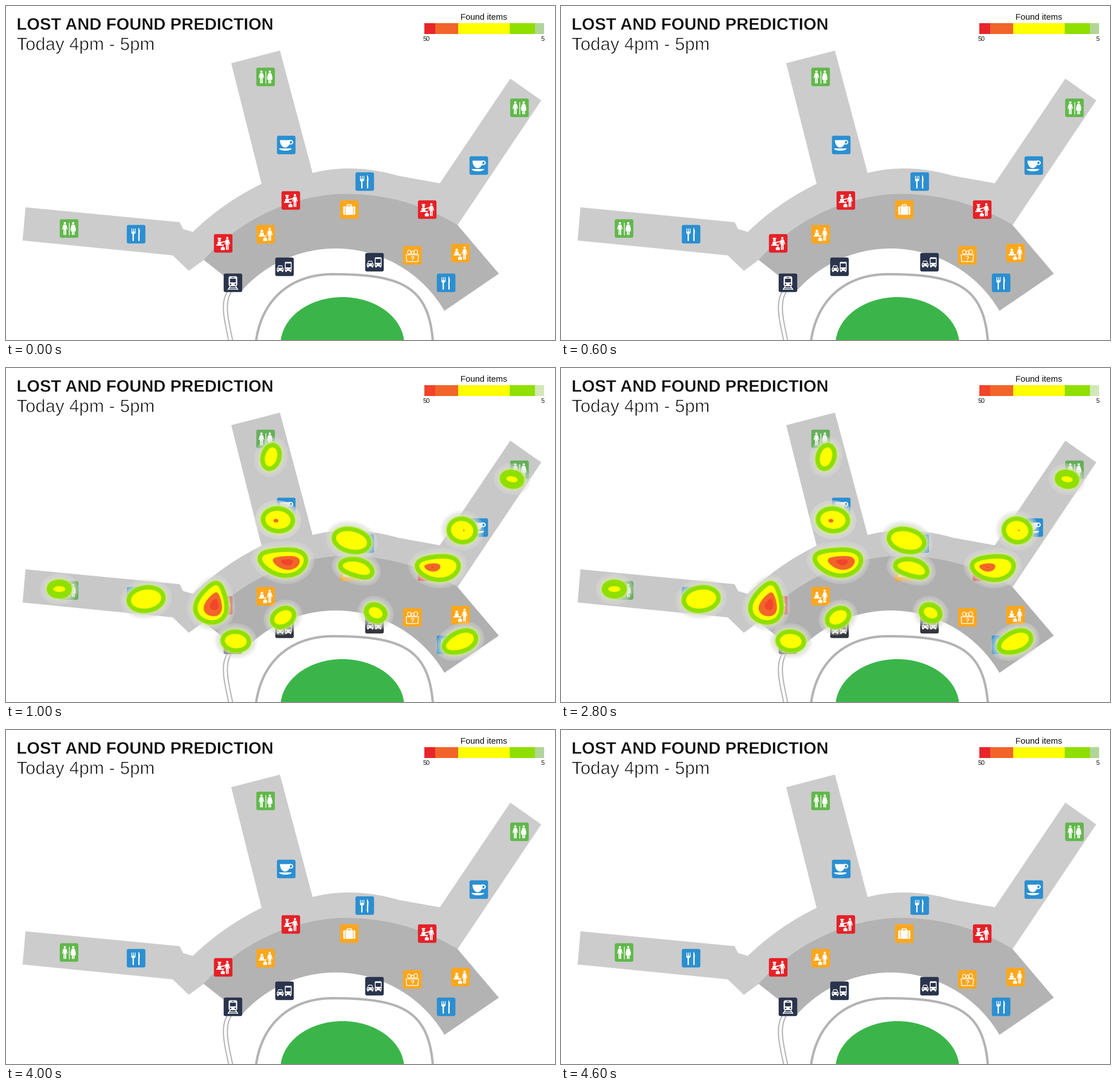
Animation of 958x584 px, one loop 5000 ms. Source, as a matplotlib script:

```python
from math import comb

import numpy as np
import matplotlib.pyplot as plt
from matplotlib.animation import FuncAnimation
from matplotlib.patches import Circle, Ellipse, FancyBboxPatch, Polygon, Rectangle
from matplotlib.patheffects import Stroke

W, H, DPI = 958, 584, 64
PT = 72 / DPI  # points per pixel

LIGHT, DARK = "#cccccc", "#b3b3b3"
RED, ORANGE, YELLOW, LIME, PALE = "#e8252b", "#f1652a", "#ffff00", "#8fdf00", "#b1d598"
GREEN, BLUE, SIGN, AMBER, NAVY = "#61b84a", "#2b8fd1", "#e52127", "#fda71c", "#2a344c"
HOT_RED = "#f2442a"
# Colours that differ while the heat layer is on
WARM = {LIGHT: "#c8c8c8", DARK: "#b0b0b0", RED: HOT_RED, PALE: "#d4e7b9",
        GREEN: "#65b05a", NAVY: "#33363c"}

fig = plt.figure(figsize=(W / DPI, H / DPI), dpi=DPI, facecolor="white")
ax = fig.add_axes([0, 0, 1, 1])
ax.set_xlim(0, W)
ax.set_ylim(H, 0)
ax.axis("off")

tinted, heat_layer = [], []


def add(patch, color, z=1):
    patch.set(facecolor=color, edgecolor="none", linewidth=0, zorder=z)
    ax.add_patch(patch)
    if color in WARM:
        tinted.append((patch, color))


# ---- curves ----
def arc(p, q, r):
    """Circular arc from p through q to r."""
    z = np.array([complex(*k) for k in (p, q, r)])
    w = (z[2] - z[0]) / (z[1] - z[0])
    mid = z[0] + (z[1] - z[0]) * (w - abs(w) ** 2) / (2j * w.imag)
    turn = np.unwrap(np.angle(z - mid))
    c = mid + abs(z[0] - mid) * np.exp(1j * np.linspace(turn[0], turn[2], 50))
    return np.column_stack([c.real, c.imag])


def bezier(*points):
    n, t = len(points) - 1, np.linspace(0, 1, 50)[:, None]
    return sum(comb(n, i) * t**i * (1 - t) ** (n - i) * np.array(p)
               for i, p in enumerate(points))


def oval(x, y, rx, ry, tilt=0, egg=0, bend=0):
    """Ellipse that can taper to one end and bow its long axis."""
    a, r = np.linspace(0, 2 * np.pi, 60), np.radians(tilt)
    u = rx * np.cos(a)
    v = ry * (np.sin(a) * (1 + egg * np.cos(a)) + bend * np.cos(2 * a))
    return np.column_stack([x + u * np.cos(r) - v * np.sin(r),
                            y + u * np.sin(r) + v * np.cos(r)])


# ---- floor plan and header ----
def draw_plan():
    add(Polygon(np.vstack([
        [(29, 410), (34, 352), (303, 378), (309, 390)],
        arc((326, 395), (383, 348), (446, 311)),
        [(393, 100), (478, 78)],
        bezier((535, 292), (605, 274), (685, 297)),
        [(757, 310), (880, 127), (934, 165), (788, 383)],
        [(575, 420), (345, 444), (319, 463), (291, 436)],
    ])), LIGHT)
    add(Polygon(np.vstack([
        arc((345, 444), (440, 369), (575, 329)),
        bezier((575, 329), (690, 324), (788, 383)),
        [(860, 468)],
        arc((765, 533), (578, 424), (412, 497)),
    ])), DARK)

    def track(points, width):
        ax.plot(*points.T, color=DARK, lw=width * PT, zorder=1)

    track(bezier((436, 588), (446, 510), (500, 469), (570, 469)), 4.2)
    track(bezier((570, 469), (690, 469), (738, 490), (745, 588)), 4.2)
    for dx in (0, 7):
        track(bezier((387, 498), (373, 520), (381, 548), (389, 587)) + (dx, 0), 2)
    add(Ellipse((587, 592), 216, 166), "#3bb54a")


def label(x, y, text, size, thin=0.0, **kw):
    t = ax.text(x, y, text, fontsize=size * PT, family="Liberation Sans",
                color="#0c0c0c", va="baseline", **kw)
    if thin:
        t.set_path_effects([Stroke(linewidth=thin * PT, foreground="white")])


def draw_header():
    label(18.5, 41.5, "LOST AND FOUND PREDICTION", 29.2, 0.4, weight="bold")
    label(18.5, 77, "Today 4pm - 5pm", 31.2, 0.8)
    label(833.5, 24, "Found items", 14.7, ha="center")
    label(728, 61, "50", 11)
    label(934, 61, "5", 11)
    edges = [730, 749, 789, 879, 923, 939]
    for a, b, c in zip(edges, edges[1:], [RED, ORANGE, YELLOW, LIME, PALE]):
        add(Rectangle((a, 30), b - a, 19), c)


# ---- icons ----
class Icon:
    """Rounded tile with a white glyph drawn around its centre."""

    def __init__(self, x, y, color):
        self.x, self.y, self.bg = x, y, color
        self.box(0, -16.2, 32.4, 32.4, 3, color)

    def box(self, mid, top, w, h, r=0.01, c="white"):
        add(FancyBboxPatch((self.x + mid - w / 2, self.y + top), w, h,
                           boxstyle=f"round,pad=0,rounding_size={r}"), c, 2)

    def dot(self, x, y, r, c="white"):
        add(Circle((self.x + x, self.y + y), r), c, 2)

    def poly(self, pts, c="white"):
        add(Polygon(np.array(pts) + (self.x, self.y)), c, 2)

    def trapezoid(self, mid, top, w, base, h, c="white"):
        self.poly([(mid - w / 2, top), (mid + w / 2, top),
                   (mid + base / 2, top + h), (mid - base / 2, top + h)], c)

    def line(self, pts, w=1.5):
        ax.plot(*(np.array(pts) + (self.x, self.y)).T, color="white", lw=w * PT,
                solid_capstyle="round", zorder=2)

    def person(self, x, dress=False):
        self.dot(x, -9.3, 2)
        if dress:
            self.trapezoid(x, -6.7, 4, 9.4, 11.7)
        else:
            self.box(x, -6.7, 4.8, 9.5, 0.8)
        for s in (-1, 1):
            self.line([(x + 2.2 * s, -5.8), (x + 4.1 * s, 1.3)], 1.4)
            self.box(x + 1.35 * s, 2, 2, 9.3)


def toilets(k):
    k.person(-7.3)
    k.line([(0, -10.5), (0, 11)], 1.3)
    k.person(7.3, dress=True)


def cup(k):
    half = np.linspace(0, np.pi, 24)
    for mid, top, rx, ry in [(-2, -8.5, 9, 13), (-1.5, 6, 11, 4)]:
        k.poly(np.column_stack([mid + rx * np.cos(half), top + ry * np.sin(half)]))
    k.line(oval(7.6, -4.8, 3.7, 3.2), 1.8)


def cutlery(k):
    for dx in (-2.7, 0, 2.7):
        k.line([(dx - 4.9, -10.5), (dx - 4.9, -3.5)], 1.3)
    k.box(-4.9, -4.5, 6.6, 4, 1.5)
    k.poly(bezier((4, -11.5), (7.5, -9), (7.2, 1.5), (4, 1.5)))
    for x in (-4.9, 5.4):
        k.line([(x, -2), (x, 10.5)], 2.3)


def clerk(k):
    k.dot(-6.5, -5.5, 2.3)
    k.box(-6.5, -2.8, 7, 4.8, 1.5)
    k.box(-5.5, 2, 13, 2.2)
    k.person(7.2)
    k.box(-0.7, 7, 7, 4.8, 0.8)
    k.box(-0.7, 5.4, 3, 2)


def officer(k):
    clerk(k)
    k.box(-6.5, -9.7, 6.4, 2.1, 0.7)
    k.line([(-4, -1.5), (4.5, -3.5)], 1.7)


def suitcase(k):
    k.box(0, -9.3, 9, 5, 1.5)
    k.box(0, -7.6, 5.6, 3, 0.5, k.bg)
    k.box(0, -5.8, 21, 15, 2)
    for x in (-7, 7):
        k.box(x, -5.8, 1, 15, c=k.bg)


def basket(k):
    k.trapezoid(0, -1.6, 23, 21, 13)
    k.trapezoid(0, -0.3, 20.2, 18.4, 10.4, k.bg)
    for x, r in [(-5.5, 3.6), (0.5, 2.8), (6, 4)]:
        k.line(oval(x, -2 - r, r * 0.8, r), 1.2)
    ax.text(k.x, k.y + 9, "?", fontsize=11 * PT, family="Liberation Sans",
            weight="bold", color="white", ha="center", va="baseline", zorder=2)


def traffic(k):
    k.trapezoid(-7.5, -2.5, 6.4, 10.5, 5.5)
    k.trapezoid(-7.5, -1.2, 5, 7.6, 3, k.bg)
    k.box(-7.5, 2.2, 11.8, 5, 1)
    k.box(6.5, -8.6, 11.8, 15.8, 1.6)
    k.box(6.5, -5.8, 9, 6.8, c=k.bg)
    for mid in (-7.5, 6.5):
        for s in (-1, 1):
            k.dot(mid + 3.7 * s, 4.4, 1, k.bg)
            k.box(mid + 3.9 * s, 6.5, 2.5, 2.6)


def train(k):
    k.box(0, -11.5, 15, 17.5, 3)
    k.box(0, -7.3, 10.4, 6.6, 0.8, k.bg)
    k.box(0, -10, 5, 1.1, c=k.bg)
    for s in (-1, 1):
        k.dot(4.2 * s, 2.6, 1.4, k.bg)
        k.line([(5 * s, 6.5), (8.5 * s, 11.7)], 1.6)
    for y, w in [(8.6, 12), (11.3, 16)]:
        k.box(0, y - 0.6, w, 1.3)


ICONS = [
    (toilets, GREEN, [(453, 124), (896, 178), (110, 389)]),
    (cup, BLUE, [(489, 243), (825, 279)]),
    (cutlery, BLUE, [(626, 307), (227, 399), (768, 484)]),
    (officer, SIGN, [(497, 340), (379, 415), (735, 356)]),
    (suitcase, AMBER, [(599, 356)]),
    (clerk, AMBER, [(453, 399), (793, 432)]),
    (basket, AMBER, [(709, 436)]),
    (traffic, NAVY, [(486, 456), (643, 448)]),
    (train, NAVY, [(396, 484)]),
]


# ---- heat map ----
def layer(outline, color, grow, z, alpha=1.0):
    solid = alpha == 1
    p = Polygon(outline, facecolor=color if solid else "none", edgecolor=color,
                linewidth=2 * grow * PT, joinstyle="round", alpha=alpha, zorder=z)
    heat_layer.append(ax.add_patch(p))


def heat(x, y, rx, ry, *form, hot=None):
    """Yellow spot, lime band and soft halo; hot = centre and share of the hot part."""
    spot = oval(x, y, rx, ry, *form)
    band = max(8, 15 - 0.7 * ry)  # small spots fade more slowly
    glow = [(11, "#dedede", 0.32), (7.5, "#d6dacd", 0.35),
            (4, "#d9efa0", 0.4), (2, "#bfe860", 0.5)]
    for z, (extra, color, alpha) in enumerate(glow, 5):
        layer(spot, color, band + extra, z, alpha)
    layer(spot, LIME, band, 9)
    layer(spot, "#c6ef00", 0.9, 10)
    layer(spot, YELLOW, 0, 11)
    if hot:
        hx, hy, share = hot
        inner = oval(hx, hy, rx * share, ry * share, *form)
        layer(inner, "#fba51c", 0.7, 12)
        layer(inner, ORANGE, 0, 13)
        core = max(0, share - 0.35)
        layer(oval(hx + 4 * core, hy, rx * core, ry * core, *form), HOT_RED, 0, 14)


def draw_heat():
    # centre, half axes, then tilt, taper and bow
    heat(462.5, 155.5, 16.5, 9.8, -75)
    heat(474.5, 265.5, 21.5, 15, 5)
    heat(474.5, 265.5, 21.5, 15, 5, hot=(471, 267, 0.18))
    heat(483, 337.5, 36, 18, 3, 0.2, -0.15, hot=(489, 339, 0.64))
    heat(603, 301.5, 27, 15, 13)
    heat(611.5, 350, 24, 9.5, 15, 0.1, 0.12)
    heat(753.5, 348, 32, 16, 0, 0.15, -0.12, hot=(744, 348, 0.42))
    heat(883, 194.5, 9.5, 4.6, 10)
    heat(796, 284, 19, 16, 10, hot=(799, 284, 0.05))
    heat(360, 410, 30.5, 21, -76, -0.45, hot=(362.5, 413, 0.68))
    heat(401, 477.5, 18.5, 12, 5)
    heat(483.5, 436, 16, 10.5, -30)
    heat(645, 428, 12, 8.6, 25)
    heat(792, 479, 25, 12.5, -22, 0.15)
    heat(93, 386.5, 10, 4.6)
    heat(244.5, 404, 26, 16, -8)


draw_plan()
draw_header()
for glyph, color, places in ICONS:
    for x, y in places:
        glyph(Icon(x, y, color))
draw_heat()


def update(second):
    on = 1 <= second < 4
    for p in heat_layer:
        p.set_visible(on)
    for p, color in tinted:
        p.set_facecolor(WARM[color] if on else color)
    return []


anim = FuncAnimation(fig, update, frames=5, interval=1000, repeat=True,
                     repeat_delay=0, blit=False)
plt.show()
```
